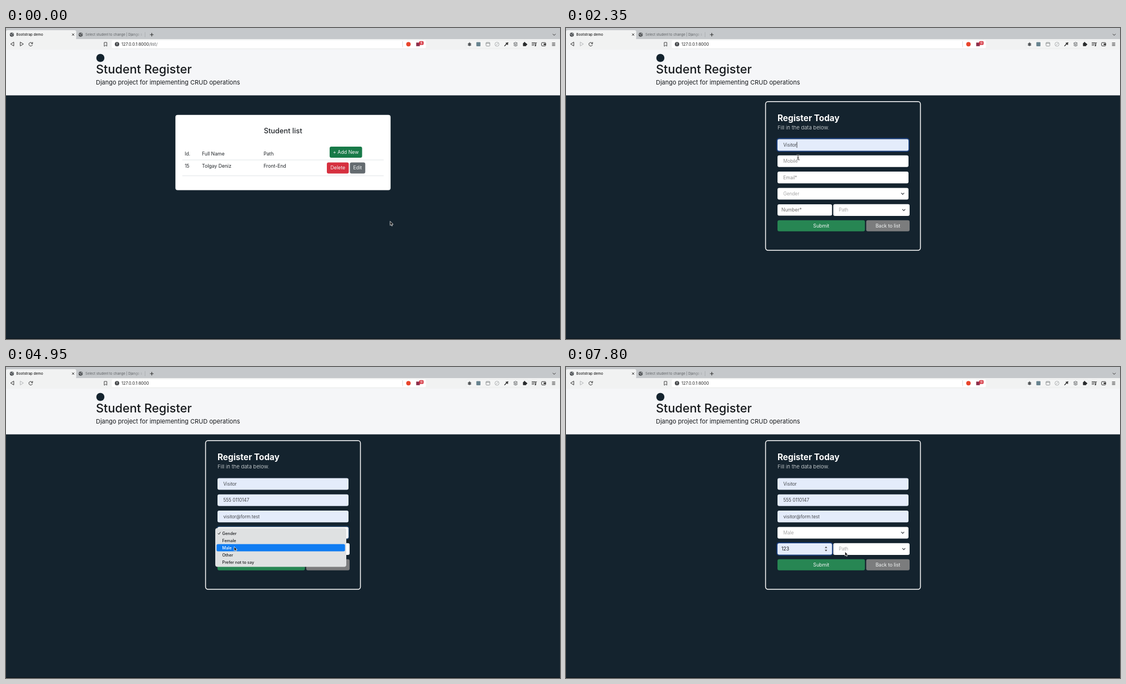
An HTML page that plays this animation: 998x561 px, repeating every 8000 ms.

```html
<!DOCTYPE html>
<html lang="en">
<head>
<meta charset="utf-8">
<title>Student Register</title>
<style>
  html, body { margin: 0; width: 100%; height: 100%; overflow: hidden; background: #14232e; }
  svg { display: block; width: 100vw; height: 100vh; }
  text { font-family: Inter, "Open Sans", sans-serif; white-space: pre; }
  .plain { font-family: "Liberation Sans", Arial, sans-serif; }
</style>
</head>
<body>
<svg id="stage" viewBox="0 0 998 561"></svg>
<script>
const LOOP = 8000;
const PAGE_SWITCH = 690;
const INK = '#14232e';

// ---- drawing helpers ----
const rect = (x, y, w, h, r, fill, extra = '') =>
  `<rect x="${x}" y="${y}" width="${w}" height="${h}" rx="${r}" fill="${fill}" ${extra}/>`;
const circle = (x, y, r, fill, extra = '') =>
  `<circle cx="${x}" cy="${y}" r="${r}" fill="${fill}" ${extra}/>`;
const line = (d, color = '#333', w = 1, extra = '') =>
  `<path d="${d}" fill="none" stroke="${color}" stroke-width="${w}" stroke-linecap="round" stroke-linejoin="round" ${extra}/>`;
const text = (x, y, size, str, fill = '#212529', weight = 400, extra = '') =>
  `<text x="${x}" y="${y}" font-size="${size}" fill="${fill}" font-weight="${weight}" ${extra}>${str}</text>`;
const MID = 'text-anchor="middle"';
const group = (id, body, extra = '') => `<g id="${id}" ${extra}>${body}</g>`;
const button = (x, y, w, fill, label, size = 8.8) =>
  rect(x, y, w, 20, 3, fill) + text(x + w / 2, y + 13, size, label, '#f4f6f6', 400, MID);
const chevron = (x, y) => line(`M${x - 2.3} ${y - 1.2}l2.3 2.4l2.3-2.4`, '#343a40', 1.2);
const globe = (x, y) => circle(x, y, 3.7, '#4a4d50') +
  line(`M${x - 2.6} ${y - 1}q1.6 .2 2.2 1.2t1.4 2M${x + .6} ${y - 2.8}q-.4 1.6 2 2`, '#d5d7d9', .9);

// ---- browser frame ----
function browserBar() {
  return rect(0, 0, 998, 20, 0, '#c5c8cb') +
    rect(0, 4, 126.5, 17, 3, '#f1f2f2') + rect(0, 20, 998, 19.5, 0, '#f1f2f2') +
    globe(10.5, 12) + text(18.5, 14.2, 6.35, 'Bootstrap demo', '#222', 500) +
    line('M119.2 10.2l3.4 3.4m0-3.4l-3.4 3.4', '#333') +
    globe(134.5, 12) +
    text(143, 14.2, 6.1, 'Select student to change | Django s', 'url(#fade)') +
    line('M250.5 8v8', '#a3a6a9', .7) +
    line('M259.8 12h5.6m-2.8-2.8v5.6', '#333', 1.1) +
    line('M985.2 11l2.3 2.3l2.3-2.3', '#333', 1) +
    line('M14 25.8v6.6l-5.3-3.3z', '#333', 1) +
    line('M25.7 25.8v6.6l5.3-3.3z', '#333', 1, 'id="forward"') +
    line('M47.6 28a3.3 3.3 0 1 0 0 2.6m.3-4.8v2.4h-2.4', '#333', 1) +
    line('M177.3 26h4.4v6.8l-2.2-1.7l-2.2 1.7z', '#333', .9) +
    rect(190.5, 22.3, 566, 14, 2.5, '#fff') +
    circle(200, 29.2, 3.9, '#44474a') + line('M200 27v2.4m0 1.7v.1', '#fff', 1) +
    `<text x="208" y="31.7" font-size="7.5" fill="#222">127.0.0.1:8000<tspan id="path" fill="#5b5e61">/list/</tspan></text>` +
    line('M714.5 24.5v9.5', '#cfd1d3', .8) +
    circle(725, 29.2, 4, '#e8452c') + rect(739, 26.3, 6.5, 6.5, 0, '#8c2f4c') +
    rect(744.3, 23.8, 8, 6.6, 1.6, '#d3303c') +
    text(748.3, 28.9, 4.6, '15', '#fff', 600, MID + ' id="badge"') +
    toolIcons();
}

function toolIcons() {
  return rect(829, 22.6, 112, 13.6, 2.5, '#f4f5f5', 'stroke="#e6e7e8" stroke-width=".6"') +
    rect(832.6, 26.8, 4.8, 5.8, 2, '#55585b') + line('M832 28.3h6m-6 2.7h6m-3-5.3v2', '#55585b', .8) +
    rect(847.3, 25.5, 7.4, 7.4, 1, '#67838f') +
    rect(864.8, 26, 6.8, 6.6, 1, 'none', 'stroke="#85888b" stroke-width=".9"') + line('M865 27.7h6.4', '#85888b', .9) +
    circle(884.5, 29.3, 3.7, 'none', 'stroke="#a4a7aa" stroke-width=".9"') + line('M882.9 31l3.2-3.4', '#a4a7aa', .9) +
    line('M898.3 32.3l3.6-3.7', '#333', 1.4) + line('M901.3 27.2l2.3 2.3m-1.2-1.1l1.5-1.6', '#333', 2) +
    line('M914.8 27.2l3.2-1.5l3.2 1.5l-3.2 1.5zm0 2.2l3.2 1.5l3.2-1.5m-6.4 2l3.2 1.5l3.2-1.5', '#65686b', 1) +
    rect(931.3, 27, 6, 5.8, .8, '#292b2d') + circle(934.2, 26.6, 1.4, '#292b2d') + circle(937.6, 29.7, 1.4, '#292b2d') +
    line('M947.5 26.5h6m-6 2.3h6m-6 2.3h3.3m3.7 .4v-4.8h1.4', '#333', 1) + circle(953.6, 31.7, 1.2, '#333') +
    rect(964.8, 26.3, 7.4, 6, 1, 'none', 'stroke="#333" stroke-width="1"') + rect(968.5, 28, 4, 2.7, .5, '#333') +
    line('M984 26.9h5m-5 2.4h5m-5 2.4h5', '#333', 1);
}

function header() {
  return rect(0, 39, 998, 82.5, 0, '#f5f6f8') +
    circle(170, 54, 7.3, INK) +
    text(162, 82.2, 21.75, 'Student Register', '#16191c', 500) +
    text(162, 102.3, 11, 'Django project for implementing CRUD operations', '#16191c');
}

// ---- list page ----
function listPage() {
  return rect(305.2, 156.8, 387.6, 135.7, 4, '#fff') +
    text(499, 189.5, 12.85, 'Student list', '#212529', 500, MID) +
    text(322, 230, 8.5, 'Id.') + text(353, 230, 8.7, 'Full Name') + text(464, 230, 8.6, 'Path') +
    line('M318 238h362M318 266.6h362', '#dee2e6', .9) +
    text(322, 251.5, 8.3, '15') + text(353, 251.5, 8.7, 'Tolgay Deniz') + text(464, 251.5, 8.7, 'Front-End') +
    button(583, 214, 58.5, '#187a48', '+ Add New') +
    button(578, 242.4, 39.5, '#d6303f', 'Delete') +
    button(619.5, 242.4, 27.7, '#646b70', 'Edit');
}

// ---- form page ----
// focus: [from, to]; hint: preview time; fill: accepted time
const FIELDS = [
  { id: 'name',   x: 381, y: 200.4, w: 236, pad: 10.5, blank: 'Full Name*', value: 'Visitor', focus: [1630, 2750], hint: 2020, fill: 2220 },
  { id: 'mobile', x: 381, y: 229.7, w: 236, pad: 10.5, blank: 'Mobile*', value: '555 0110147', focus: [2750, 3540], hint: 3140, fill: 3340 },
  { id: 'email',  x: 381, y: 259.1, w: 236, pad: 10.5, blank: 'Email*', value: 'visitor@form.test', focus: [3540, 4600], hint: 3800, fill: 4060 },
  { id: 'gender', x: 381, y: 288.4, w: 236, pad: 10.5, blank: 'Gender', value: 'Male', focus: [4600, 6350], fill: 5640, select: true },
  { id: 'number', x: 381, y: 318, w: 98.2, pad: 7, blank: 'Number*', value: '123', focus: [6350, LOOP], hint: 6880, fill: 7280, weight: 400 },
  { id: 'path',   x: 481.5, y: 317.8, w: 137.5, pad: 10, blank: 'Path', value: '', focus: [LOOP, LOOP], fill: LOOP, select: true }
];

function fieldBox(f) {
  const size = f.weight ? 8.6 : 8.3;
  const height = f.weight ? 20.4 : 21.1;
  return rect(f.x - .8, f.y - .8, f.w + 1.6, height + 1.6, 3.8, 'none', `id="${f.id}-ring" stroke="${f.select ? '#17395c' : '#193f80'}" stroke-width="2"`) +
    rect(f.x, f.y, f.w, height, 3, '#fff', `id="${f.id}-box"`) +
    text(f.x + f.pad, f.y + 13.4, size, f.blank, '#777', f.weight || 300, `id="${f.id}-text"`) +
    (f.select ? chevron(f.x + f.w - 10.5, f.y + 10.6) : '') +
    line('', '#111', .8, `id="${f.id}-caret"`);
}

function formPage() {
  return rect(359.5, 132.8, 279, 268.2, 4.5, 'none', 'stroke="#fff" stroke-width="1.5"') +
    text(381, 168, 15.3, 'Register Today', '#fff', 700) +
    text(381, 183, 9.6, 'Fill in the data below.', '#e4e8ea', 300) +
    FIELDS.map(fieldBox).join('') +
    group('spin', '<path d="M466.2 326.6l2.2-2.8l2.2 2.8zM466.2 329.8l2.2 2.8l2.2-2.8z" fill="#444"/>') +
    button(381, 346.8, 157.5, '#278653', 'Submit') +
    button(540.8, 346.8, 78.2, '#7b7c7d', 'Back to list', 8.65);
}

const OPTIONS = ['Gender', 'Female', 'Male', 'Other', 'Prefer not to say'];
const ROW = 13;
function popup() {
  return rect(377, 290.5, 236, 70, 4, '#dfe1e2') +
    rect(379.3, 293.5, 231.4, ROW, 2.5, '#0f7cf2', 'id="mark"') +
    line('M382 300.2l1.5 1.8l2.6-4', '#222', 1) +
    OPTIONS.map((o, i) => text(389.5, 302.6 + i * ROW, 7.3, o, '#1d1f21', 500, `id="option${i}"`)).join('');
}

// ---- pointers, drawn around (0, 0) ----
const BEAM = 'M-1.7-4.2q1.5 0 1.7.9q.2-.9 1.7-.9M0-3.3v6.6M-1.7 4.2q1.5 0 1.7-.9q.2.9 1.7.9M-1 1h2';
const POINTERS = {
  arrow: '<path d="M0 0v7.7l1.8-1.5l1.1 2.5l1.3-.6l-1.1-2.4h2.4z" fill="#111" stroke="#f4f4f4" stroke-width=".8" stroke-linejoin="round"/>',
  hand: '<path d="M-.7 0q.8-.9 1.5 0v2.8l3 .8q.8.3.6 1.4l-.6 3h-3.8l-2.3-3.2q-.2-1 .8-.7l.8.7z" fill="#fff" stroke="#111" stroke-width=".7" stroke-linejoin="round"/>',
  beam: line(BEAM, '#fff', 1.7, 'opacity=".6"') + line(BEAM, '#222', .9)
};

const stage = document.getElementById('stage');
stage.innerHTML =
  `<defs><linearGradient id="fade" gradientUnits="userSpaceOnUse" x1="228" x2="247" y1="0" y2="0">
    <stop stop-color="#5c5f62"/><stop offset="1" stop-color="#5c5f62" stop-opacity=".15"/></linearGradient></defs>` +
  rect(0, 0, 998, 561, 0, INK) + browserBar() + header() +
  group('list', listPage()) + group('form', formPage()) + group('popup', popup()) +
  rect(0, 560, 998, 1, 0, '#0a1218') +
  group('status', rect(-2, 550.5, 52, 12, 2, '#6d777e') + text(3, 557.9, 6.25, '127.0.0.1:8000', '#1d2327')) +
  Object.entries(POINTERS).map(([k, body]) => group(k, body)).join('');

// ---- timing ----
// bursts of redraws: [first, last, count]
const BURSTS = [[70, 750, 9], [880, 1630, 10], [1760, 2020, 3], [2220, 2350, 2], [2550, 2810, 3],
  [3010, 3140, 2], [4320, 5090, 12], [5220, 5760, 7], [6020, 6150, 2], [6350, 6480, 2]];
const SINGLES = [0, 3340, 3540, 3800, 4060, 6680, 6880, 7080, 7280, 7540, 7800];
const TICKS = BURSTS.flatMap(([a, b, n]) => Array.from({ length: n }, (_, i) => a + (b - a) * i / (n - 1)))
  .concat(SINGLES).sort((a, b) => a - b);

// pointer route: [time, x, y]
const ROUTE = [[0, 692, 348.5], [70, 692, 348.5], [500, 619.5, 229], [1000, 619.5, 229], [1500, 418, 211],
  [1760, 418, 212], [2020, 418, 232], [2550, 418, 233], [2810, 415, 242], [3010, 414, 258], [3140, 414, 264],
  [3340, 414, 264], [3540, 414, 271], [3800, 411, 290], [4060, 409, 292], [4320, 406.5, 298], [4600, 407, 299],
  [4950, 411, 324], [5220, 412, 326], [5490, 415, 337], [5760, 416, 338], [6020, 416, 331], [6150, 416, 328],
  [6480, 416, 330], [6680, 416, 348], [6880, 416, 361], [7080, 418, 361], [7280, 496, 340], [7540, 498, 336],
  [7800, 502.5, 333]];
const SHAPES = [[0, 'arrow'], [420, 'hand'], [1030, 'arrow'], [1110, 'beam'], [3800, 'arrow'], [6020, 'beam'], [7280, 'arrow']];
const POPUP_ALPHA = [[0, 0], [4600, 1], [5390, .7], [5480, .4], [5570, .14], [5640, 0]];

const latest = (table, t) => table.filter(row => row[0] <= t).pop()[1];

function along(t) {
  const i = ROUTE.findIndex(p => p[0] > t);
  if (i < 0) return ROUTE[ROUTE.length - 1].slice(1);
  const [a, b] = [ROUTE[i - 1], ROUTE[i]];
  const k = (t - a[0]) / (b[0] - a[0]);
  const e = k * k * (3 - 2 * k);
  return [1, 2].map(j => a[j] + (b[j] - a[j]) * e);
}

const el = id => document.getElementById(id);
const show = (id, on) => { el(id).style.display = on ? '' : 'none'; };

function drawField(f, t) {
  const focused = t >= f.focus[0] && t < f.focus[1];
  const filled = t >= f.fill;
  const hinted = !filled && t >= f.hint;
  const label = el(f.id + '-text');
  label.textContent = filled || hinted ? f.value : f.blank;
  label.setAttribute('class', hinted ? 'plain' : '');
  label.setAttribute('font-size', hinted ? 7 : f.weight ? 8.6 : 8.3);
  label.setAttribute('font-weight', hinted ? 400 : f.weight || 300);
  label.setAttribute('fill', f.select ? '#8b8b8b' : filled || hinted ? '#16181a' : '#6c6c6c');
  el(f.id + '-box').setAttribute('fill', !f.select && (filled || hinted) ? '#e4ecfb' : '#fff');
  show(f.id + '-ring', focused);

  const since = t - (filled ? f.fill : f.focus[0]);
  const caretOn = focused && !f.select && since % 1000 < 500;
  show(f.id + '-caret', caretOn);
  if (caretOn) {
    const x = f.x + f.pad + (filled ? label.getComputedTextLength() + .4 : 0);
    el(f.id + '-caret').setAttribute('d', `M${x} ${f.y + 5.5}v9.8`);
  }
}

function draw(t) {
  const onForm = t >= PAGE_SWITCH;
  show('list', !onForm);
  show('form', onForm);
  show('path', !onForm);
  el('forward').setAttribute('stroke', onForm ? '#b4b6b8' : '#333');
  el('badge').textContent = onForm ? '10' : '15';
  show('status', t >= 450 && t < 1050);
  show('spin', t >= 6020);
  FIELDS.forEach(f => drawField(f, t));

  const [x, y] = along(t);
  const alpha = latest(POPUP_ALPHA, t);
  const row = Math.max(0, Math.min(2, Math.round((y - 300) / ROW)));
  show('popup', alpha > 0);
  el('popup').setAttribute('opacity', alpha);
  el('mark').setAttribute('y', 293.5 + row * ROW);
  OPTIONS.forEach((_, i) => el('option' + i).setAttribute('fill', i === row ? '#fff' : '#1d1f21'));

  const shape = latest(SHAPES, t);
  Object.keys(POINTERS).forEach(k => show(k, k === shape));
  el(shape).setAttribute('transform', `translate(${x} ${y})`);
}

const start = performance.now();
let shown = -1;
function frame() {
  const t = (performance.now() - start) % LOOP;
  const tick = TICKS.filter(k => k <= t + 1).pop();
  if (tick !== shown) draw(shown = tick);
  requestAnimationFrame(frame);
}
frame();
</script>
</body>
</html>
```
